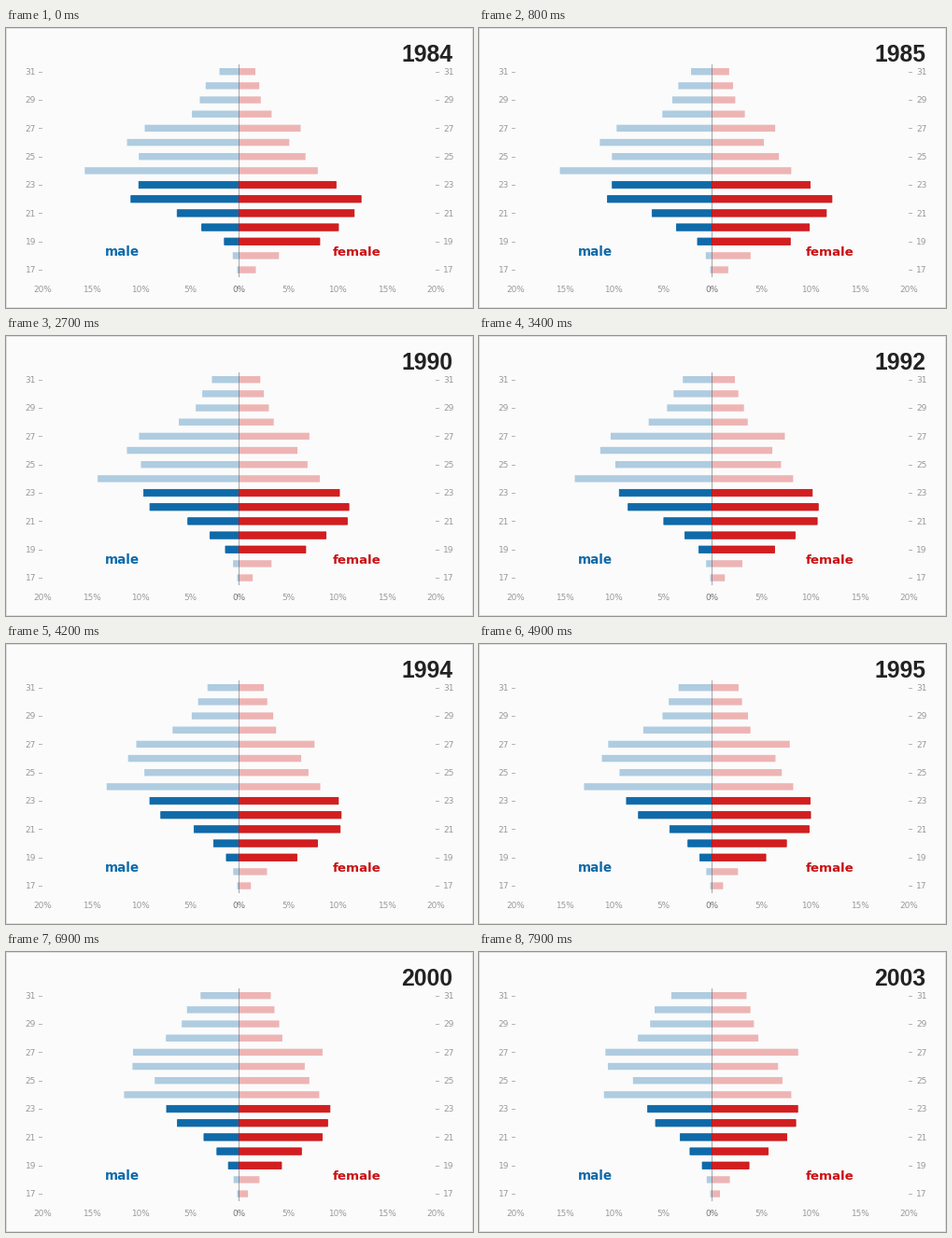
Write a matplotlib script that moves like this. It is 500 px wide and 300 px high and loops after 8 s.

```python
import math

import matplotlib.pyplot as plt
import numpy as np
from matplotlib.animation import FuncAnimation
from matplotlib.patches import Rectangle

WIDTH, HEIGHT, DPI = 500, 300, 100
FRAMES, INTERVAL = 80, 100
HOLD, YEAR_MS = 400, 400
CENTER, PX_PER_PERCENT = 249.6, 10.53
TOP_ROW, ROW_STEP, BAR_HEIGHT = 46.7, 15.17, 7.4
AGES = range(31, 16, -1)

BLUE, DARK_BLUE = "#0f6aa9", "#0b65a5"
RED, DARK_RED = "#d31e20", "#c81114"
GREY = "#999999"

# Shares in percent, ages 31 down to 17, at the start, middle and end.
MALE = np.array([
    [2, 3.4, 4, 4.8, 9.6, 11.4, 10.2, 15.7, 10.2, 11, 6.3, 3.8, 1.5, 0.65, 0.2],
    [3.2, 4.15, 4.8, 6.75, 10.45, 11.3, 9.65, 13.5, 9.1, 8, 4.6, 2.6, 1.3, 0.6, 0.2],
    [4.15, 5.85, 6.3, 7.55, 10.85, 10.6, 8.05, 11, 6.55, 5.75, 3.25, 2.25, 1, 0.55, 0.2],
])
FEMALE = np.array([
    [1.65, 2.05, 2.2, 3.3, 6.25, 5.1, 6.75, 8, 9.85, 12.4, 11.7, 10.1, 8.2, 4.05, 1.7],
    [2.5, 2.85, 3.45, 3.75, 7.65, 6.3, 7.05, 8.25, 10.1, 10.4, 10.3, 8, 5.9, 2.85, 1.2],
    [3.5, 3.9, 4.25, 4.7, 8.75, 6.7, 7.15, 8.05, 8.7, 8.5, 7.6, 5.7, 3.75, 1.8, 0.8],
])

plt.rcParams["font.family"] = "DejaVu Sans"
fig = plt.figure(figsize=(WIDTH / DPI, HEIGHT / DPI), dpi=DPI, facecolor="#fbfbfb")
ax = fig.add_axes([0, 0, 1, 1])
ax.set_xlim(0, WIDTH)
ax.set_ylim(HEIGHT, 0)
ax.axis("off")


def points(px):
    return px * 72 / DPI


def label(x, baseline, text, px, color, align="center", **style):
    return ax.text(x, baseline, text, fontsize=points(px), color=color,
                   ha=align, va="baseline", **style)


def box(x, y, width, height, color, **style):
    style = {"linewidth": 0, **style}
    return ax.add_patch(Rectangle((x, y), width, height, facecolor=color,
                                  snap=False, **style))


def bar(row, color, edge):
    y = TOP_ROW + row * ROW_STEP - BAR_HEIGHT / 2
    if 19 <= AGES[row] <= 23:
        return box(CENTER, y, 0, BAR_HEIGHT, color, edgecolor=edge,
                   linewidth=points(0.8))
    return box(CENTER, y, 0, BAR_HEIGHT, color, alpha=0.32)


def share(keys, progress):
    """Parabola through the start, middle and end rows of keys."""
    start, middle, end = keys
    bend = middle - (start + end) / 2
    return start + (end - start) * progress + 4 * bend * progress * (1 - progress)


for edge in [(0, 0, WIDTH, 1), (0, HEIGHT - 1, WIDTH, 1),
             (0, 0, 1, HEIGHT), (WIDTH - 1, 0, 1, HEIGHT)]:
    box(*edge, "#dedede")

for percent in range(-20, 21, 5):
    color = GREY if percent else "#777777"
    label(CENTER + percent * PX_PER_PERCENT, 283, f"{abs(percent)}%", 8.9, color)

for row in range(0, len(AGES), 2):
    y = TOP_ROW + row * ROW_STEP
    label(32, y + 3.3, str(AGES[row]), 9, GREY, "right")
    label(468, y + 3.3, str(AGES[row]), 9, GREY, "left")
    for x in (35, 460):
        box(x, round(y), 4, 1, "#b5b5b5")

box(249, 39, 1, 228, "#a8a8a8")
male_bars = [bar(row, BLUE, DARK_BLUE) for row in range(len(AGES))]
female_bars = [bar(row, RED, DARK_RED) for row in range(len(AGES))]

label(124.5, 244, "male", 13.5, BLUE, weight="bold")
label(375.5, 244, "female", 13.4, DARK_RED, weight="bold")
year_label = label(478.5, 35.5, "", 24.7, "#222222", "right", weight="bold",
                   family="Liberation Sans")


def draw(frame):
    elapsed = max(0, frame * INTERVAL - HOLD)
    progress = elapsed / (FRAMES * INTERVAL - INTERVAL - HOLD)
    year_label.set_text(str(1984 + math.floor(elapsed / YEAR_MS + 0.5)))
    for bars, keys, side in [(male_bars, MALE, -1), (female_bars, FEMALE, 1)]:
        for patch, percent in zip(bars, share(keys, progress)):
            patch.set_width(side * percent * PX_PER_PERCENT)
    return [year_label, *male_bars, *female_bars]


anim = FuncAnimation(fig, draw, frames=FRAMES, interval=INTERVAL,
                     repeat=True, repeat_delay=0)
plt.show()
```
